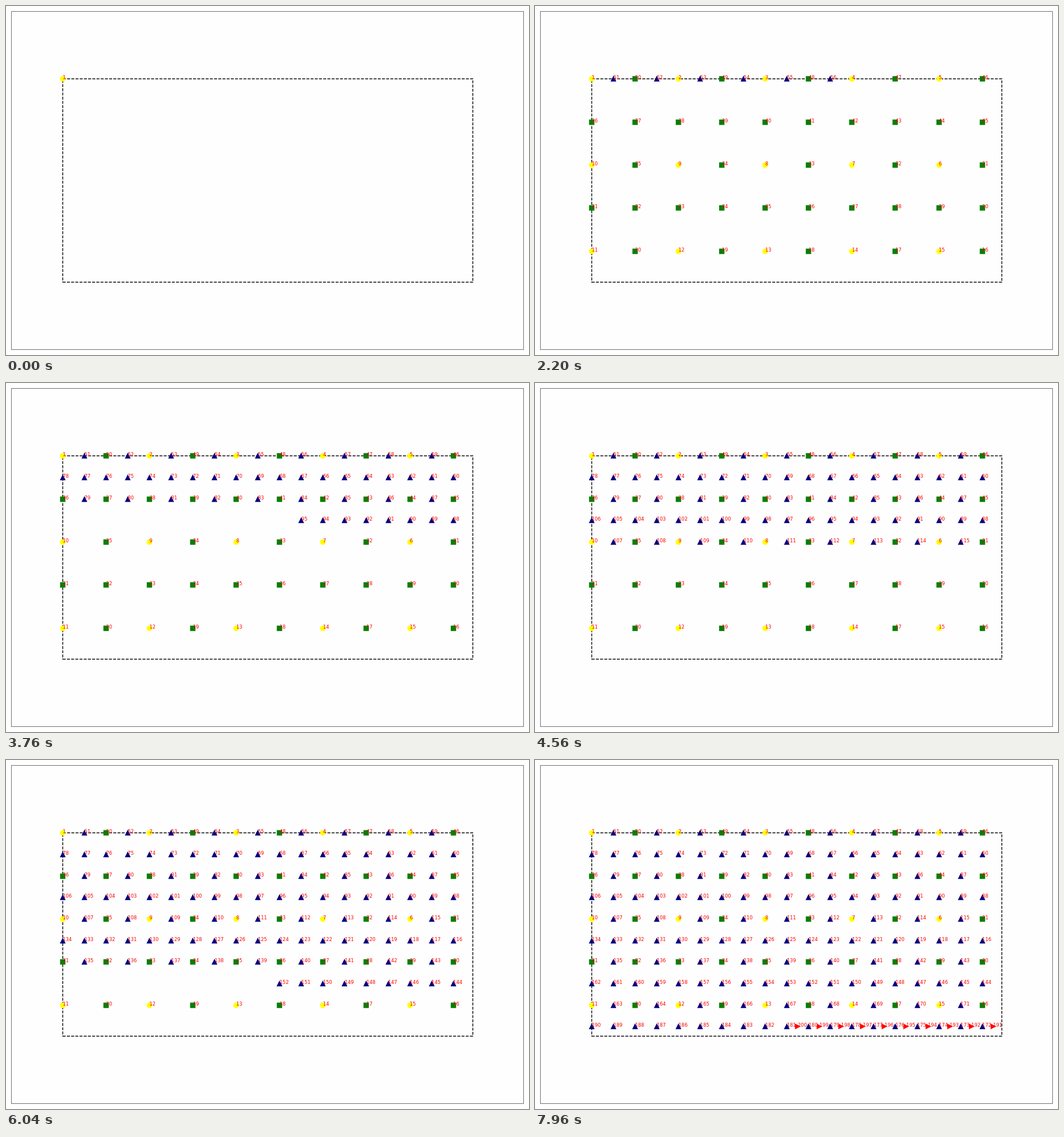
Recreate the animation shown at these times as an HTML page with a canvas. Size 917 by 611 pixels, loop 8000 ms.

```html
<!DOCTYPE html>
<html lang="en">
<head>
<meta charset="utf-8">
<title>Sampling order</title>
<style>
html, body { margin: 0; width: 100%; height: 100%; overflow: hidden; background: #fefefe; }
canvas { display: block; }
</style>
</head>
<body>
<canvas id="stage" width="917" height="611"></canvas>
<script>
const STEP = 40;
const ctx = document.getElementById('stage').getContext('2d');
const points = [];

const colX = c => 99.4 + 38.04 * c;
const rowY = r => 127.9 + 37.65 * r;

// Adds a run of n points along a row, starting at column c.
function run(kind, row, c, step, n) {
  for (let i = 0; i < n; i++) points.push({ kind, row, col: c + i * step });
}

// Coarse grid
run('circle', 0, 0, 4, 5);
run('circle', 4, 16, -4, 5);
run('circle', 8, 0, 4, 5);
// Medium grid, from the bottom up
for (const row of [8, 4, 0]) {
  run('square', row, 18, -4, 5);
  if (row) run('square', row - 2, 0, 2, 10);
}
// Fine grid, from the top down
for (let row = 0; row < 10; row += 2) {
  run('up', row, 1, 2, 9);
  run('up', row + 1, 18, -1, 19);
}
// Last row, between columns
run('right', 9, 18.5, -1, 10);

const colors = { circle: '#ffff00', square: '#008000', up: '#000080', right: '#ff0000' };

function marker({ kind, row, col }) {
  const x = Math.floor(colX(col)) + 0.5;
  const y = Math.floor(rowY(row)) + 0.5;
  ctx.fillStyle = ctx.strokeStyle = colors[kind];
  ctx.lineWidth = 1.39;
  ctx.beginPath();
  if (kind === 'circle') {
    ctx.arc(x, y, 4.17, 0, Math.PI * 2);
  } else if (kind === 'square') {
    ctx.rect(x - 4, y - 4, 8, 8);
  } else if (kind === 'up') {
    ctx.moveTo(x, y - 4);
    ctx.lineTo(x - 4, y + 4);
    ctx.lineTo(x + 4, y + 4);
  } else {
    ctx.moveTo(x + 4, y);
    ctx.lineTo(x - 4, y + 4);
    ctx.lineTo(x - 4, y - 4);
  }
  ctx.closePath();
  ctx.fill();
  ctx.stroke();
}

function label({ row, col }, number) {
  ctx.fillText(number, colX(col), Math.floor(rowY(row)) + 1);
}

function frames() {
  ctx.fillStyle = '#fefefe';
  ctx.fillRect(0, 0, 917, 611);
  ctx.strokeStyle = '#707070';
  ctx.lineWidth = 1;
  ctx.strokeRect(9.5, 9.5, 898, 592);

  ctx.strokeStyle = '#000';
  ctx.lineWidth = 1.39;
  ctx.setLineDash([5.14, 2.22]);
  ctx.beginPath();
  ctx.moveTo(99.5, 483.5);
  ctx.lineTo(818.5, 483.5);
  ctx.lineTo(818.5, 127.5);
  ctx.lineTo(99.5, 127.5);
  ctx.closePath();
  ctx.stroke();
  ctx.setLineDash([]);
}

function draw(ms) {
  const count = Math.floor(ms / STEP) % points.length + 1;
  const shown = points.slice(0, count);
  frames();
  shown.forEach(marker);
  ctx.fillStyle = '#ff0000';
  ctx.font = '8.33px "DejaVu Sans", sans-serif';
  shown.forEach((p, i) => label(p, i + 1));
}

let start;
function tick(now) {
  if (start === undefined) start = now;
  draw(Math.max(0, now - start));
  requestAnimationFrame(tick);
}
draw(0);
requestAnimationFrame(tick);
</script>
</body>
</html>
```
